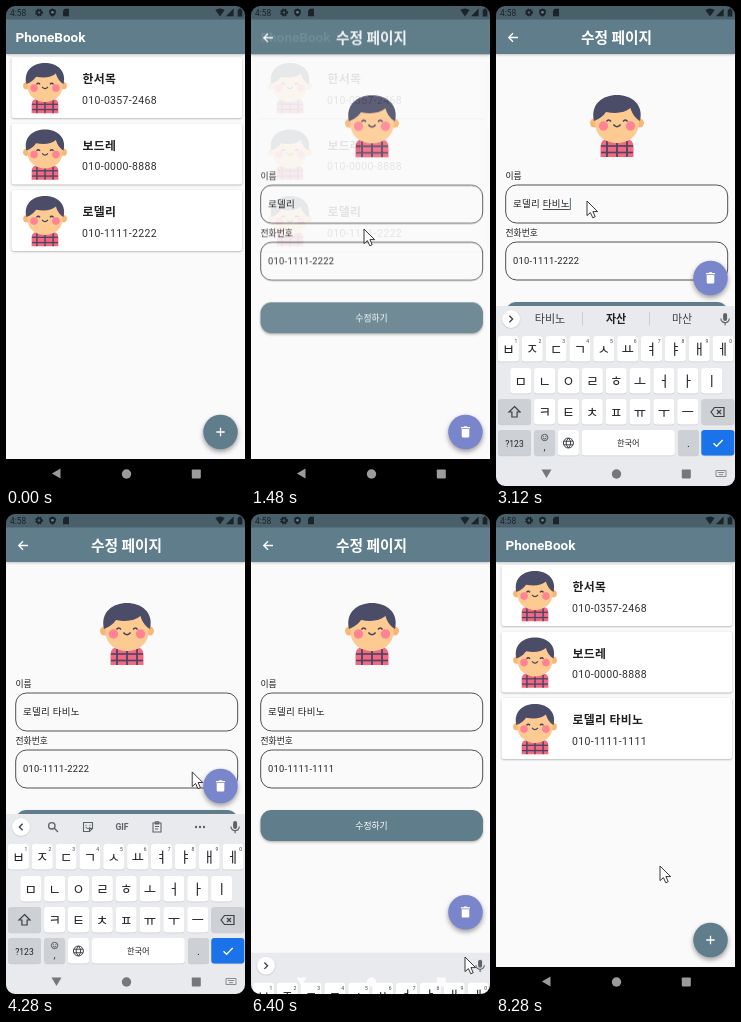
An HTML page with a canvas for the animation above (8.52 s loop, 239 by 480 pixels).

```html
<!DOCTYPE html>
<html lang="ko">
<head>
<meta charset="utf-8">
<title>PhoneBook</title>
<style>
html, body { margin: 0; width: 100%; height: 100%; overflow: hidden; background: #fafafa; }
canvas { display: block; width: 100vw; height: 100vh; }
</style>
</head>
<body>
<canvas id="stage"></canvas>
<script>
const W = 239, H = 480, LOOP = 8520;
const FONT = 'Roboto, "Noto Sans CJK KR", "Noto Sans CJK", sans-serif';
const SLATE = '#607d8b', INDIGO = '#7986cb', PAGE = '#fafafa', INK = '#212121', KEYBOARD = '#e8eaed';

const OLD_NAME = '로델리', NEW_NAME = '로델리 타비노';
const PREFIX = '010-1111-';
const PEOPLE = [['한서목', '010-0357-2468'], ['보드레', '010-0000-8888']];

const OPEN_EDIT = 1200, OPEN_LIST = 7245, PUSH = 300;
const FOCUS_NAME = 1840, FOCUS_PHONE = 3700, BLUR = 6200;

const NAME_STEPS = [[0, ''], [2320, ' '], [2440, ' ㅌ'], [2560, ' 타'], [2680, ' 탑'],
  [2800, ' 타비'], [2920, ' 타빈'], [3040, ' 타비노']];
const TAIL_STEPS = [[0, '2222'], [4360, '222'], [4560, '22'], [4760, '2'], [4920, ''],
  [5080, '1'], [5360, '11'], [5460, '111'], [5640, '1111']];
const POINTER = [[40, 213, 309], [320, 27, 102], [480, 27, 102], [1000, 113, 223], [1540, 113, 223],
  [1800, 91, 195], [3200, 91, 195], [3700, 118, 252], [4000, 118, 252], [4300, 187, 258],
  [4800, 116, 250], [5700, 116, 250], [6160, 214, 443], [6440, 214, 443], [7040, 147, 317],
  [7420, 147, 317], [7860, 169, 354], [8120, 169, 354], [8280, 164, 352]];

const canvas = document.getElementById('stage');
const buffer = document.createElement('canvas');
const off = buffer.getContext('2d');
let g = canvas.getContext('2d');

const clamp = v => Math.min(1, Math.max(0, v));
const mix = (a, b, p) => a + (b - a) * p;
const smooth = p => p * p * (3 - 2 * p);
const span = (t, start, length) => clamp((t - start) / length);

function bezier(x1, y1, x2, y2) {
  const at = (a, b, s) => 3 * a * s * (1 - s) ** 2 + 3 * b * s * s * (1 - s) + s ** 3;
  return p => {
    let lo = 0, hi = 1;
    for (let i = 0; i < 20; i++) {
      const mid = (lo + hi) / 2;
      if (at(x1, x2, mid) < p) lo = mid; else hi = mid;
    }
    return at(y1, y2, lo);
  };
}
const fastOutSlowIn = bezier(.4, 0, .2, 1), easeIn = bezier(.42, 0, 1, 1);

const current = (steps, t) => steps.filter(s => s[0] <= t).pop();

// Drawing helpers
function rect(x, y, w, h, fill) { g.fillStyle = fill; g.fillRect(x, y, w, h); }

function box(x, y, w, h, r, fill, line) {
  g.beginPath();
  g.roundRect(x, y, w, h, r);
  if (fill) { g.fillStyle = fill; g.fill(); }
  if (line) { g.strokeStyle = line; g.lineWidth = .9; g.stroke(); }
}

function disc(x, y, r, fill) {
  g.beginPath(); g.arc(x, y, r, 0, 7); g.fillStyle = fill; g.fill();
}

function icon(d, x, y, color, line = 0, scale = 1) {
  g.save();
  g.translate(x, y);
  g.scale(scale, scale);
  const path = new Path2D(d);
  if (line) { g.strokeStyle = color; g.lineWidth = line; g.stroke(path); }
  else { g.fillStyle = color; g.fill(path); }
  g.restore();
}

function shaded(blur, dy, draw, alpha = .3) {
  g.save();
  const k = canvas.width / W;
  g.shadowColor = `rgba(0,0,0,${alpha})`;
  g.shadowBlur = blur * k;
  g.shadowOffsetY = dy * k;
  draw();
  g.restore();
}

// Writes text centred vertically on y and returns its width.
function text(s, x, y, size, color, { weight = 400, align = 'left', gap = 0 } = {}) {
  g.font = `${weight} ${size}px ${FONT}`;
  g.letterSpacing = gap + 'px';
  g.textAlign = align;
  g.fillStyle = color;
  g.fillText(s, x, y + size * .36);
  return g.measureText(s).width;
}

function layer(alpha, dy, draw) {
  const main = g;
  g = off;
  g.clearRect(0, 0, W, H);
  draw();
  g = main;
  g.save();
  g.globalAlpha = alpha;
  g.drawImage(buffer, 0, dy, W, H);
  g.restore();
}

function avatar(x, y, scale) {
  const hair = '#4b4d68', skin = '#fdcb92', plaid = '#4a4565';
  g.save();
  g.translate(x, y);
  g.scale(scale, scale);
  box(-16.5, 44, 33, 18, [7, 7, 0, 0], '#f3687f');
  for (const px of [-10, 0, 10]) rect(px - .9, 46, 1.8, 16, plaid);
  for (const py of [51, 57.5]) rect(-16, py - .8, 32, 1.6, plaid);
  disc(-22.5, 28, 4.5, '#f9b776');
  disc(22.5, 28, 4.5, '#f9b776');
  icon('M-21.5 20C-21.5 2 21.5 2 21.5 20V29C21.5 41 11 48 0 48S-21.5 41-21.5 29Z', 0, 0, skin);
  icon('M-23 26C-27 9-14 0 0 0S27 9 23 26C19 24 15 19 13.5 13Q5 20-11 17Q-15 23-23 26Z', 0, 0, hair);
  disc(-13.5, 31, 4.7, '#ff8393');
  disc(13.5, 31, 4.7, '#ff8393');
  icon('M-10.5 26.5q2.2-3 4.4 0M6.1 26.5q2.2-3 4.4 0M-3.6 29.5q3.6 4.4 7.2 0', 0, 0, '#42415a', 1.6);
  g.restore();
}

function appBar() {
  shaded(3, 1.2, () => rect(0, 0, W, 48, SLATE));
}

function drawList(t) {
  rect(0, 0, W, H, PAGE);
  const edited = t >= OPEN_LIST;
  const third = edited ? [NEW_NAME, PREFIX + '1111'] : [OLD_NAME, PREFIX + '2222'];
  [...PEOPLE, third].forEach(([name, phone], i) => {
    const y = 51 + i * 66.5;
    shaded(2, .7, () => box(5.5, y, 230.5, 61, 2.5, '#fff'));
    avatar(39, y + 6, .81);
    text(name, 76.5, y + 22, 11.9, INK, { weight: 700, gap: .29 });
    text(phone, 76, y + 43, 10.5, '#303030', { gap: .32 });
  });
  appBar();
  text('PhoneBook', 9.5, 31, 13.5, '#fff', { weight: 700 });
}

function caret(x, y, t, lastChange) {
  if ((t - lastChange) % 1000 < 560) rect(x, y - 6, 1.1, 12, SLATE);
}

function drawEdit(t) {
  rect(0, 0, W, H, PAGE);
  avatar(121, 89, 1);
  text('이름', 9.5, 170, 8.8, INK);
  text('전화번호', 9.5, 227, 8.8, INK);
  box(9.7, 179, 222, 38, 11, null, '#3c3c3c');
  box(9.7, 236, 222, 38, 11, null, '#3c3c3c');

  const style = { gap: .29 };
  const [nameTime, added] = current(NAME_STEPS, t);
  const [tailTime, tail] = current(TAIL_STEPS, t);
  const nameEnd = 17 + text(OLD_NAME + added, 17, 198, 9.5, INK, style);
  const phoneEnd = 17 + text(PREFIX + tail, 17, 255, 9.3, INK, style);
  if (t >= FOCUS_NAME && t < FOCUS_PHONE) {
    caret(nameEnd, 198, t, Math.max(nameTime, FOCUS_NAME));
    if (added.length > 1) {
      const start = 17 + g.measureText('').width + textWidth(OLD_NAME + ' ', 9.5, .29);
      rect(start, 203, nameEnd - start, .8, INK);
    }
  } else if (t >= FOCUS_PHONE && t < BLUR) {
    caret(phoneEnd, 255, t, Math.max(tailTime, FOCUS_PHONE));
  }

  shaded(2.5, 1.2, () => box(9.5, 296, 222.5, 31, 11, SLATE));
  text('수정하기', 120.5, 312, 8.8, '#fff', { align: 'center' });
  appBar();
  if (t < OPEN_LIST) icon('M5 0H-4M0-4.3L-4.3 0L0 4.3', 17, 31.5, '#fff', 1.3);
  text('수정 페이지', 120.5, 32, 14.7, '#fff', { weight: 700, align: 'center' });
}

function textWidth(s, size, gap) {
  g.font = `400 ${size}px ${FONT}`;
  g.letterSpacing = gap + 'px';
  return g.measureText(s).width;
}

function drawFab(editing, y) {
  const x = 214.5;
  shaded(5, 2.5, () => disc(x, y, 17.3, editing ? INDIGO : SLATE), .38);
  if (editing) icon('M-3.8-3H3.8V4.2Q3.8 5.4 2.6 5.4H-2.6Q-3.8 5.4-3.8 4.2ZM-4.6-5H-2L-1.4-5.7H1.4L2-5H4.6V-3.8H-4.6Z', x, y, '#fff');
  else icon('M-4.2 0H4.2M0-4.2V4.2', x, y, '#fff', 1.3);
}

// Keyboard
function key(cx, cy, w, label, fill = '#fff', size = 13.5, color = '#202124') {
  box(cx - w / 2, cy - 12.4, w, 25.6, 3, '#c9ccd0');
  box(cx - w / 2, cy - 13, w, 25.6, 3, fill);
  if (label) text(label, cx, cy + .5, size, color, { align: 'center' });
}

function toolbar(t) {
  const y = 313, grey = '#5f6368';
  const typing = t >= 2440 && t < FOCUS_PHONE;
  const icons = !typing && t < BLUR;
  shaded(1.5, .5, () => disc(15, y, 9, '#fff'), .2);
  icon(icons ? 'M1.6-3.2L-1.6 0L1.6 3.2' : 'M-1.6-3.2L1.6 0L-1.6 3.2', 15, y, '#3c4043', 1.3);
  if (typing) {
    const word = current(NAME_STEPS, t)[1].trim();
    const mid = { align: 'center' };
    text(word, 54, y, 11, '#3c4043', mid);
    text('자산', 120, y, 11, INK, { align: 'center', weight: 700 });
    text('마산', 186, y, 11, '#3c4043', mid);
    rect(86, 306, .8, 14, '#c8cacd');
    rect(153, 306, .8, 14, '#c8cacd');
  } else if (icons) {
    icon('M2-1.2A3.2 3.2 0 1 1-4.4-1.2A3.2 3.2 0 1 1 2-1.2M1.1 1.1L5 5', 47, y, grey, 1.4);
    icon('M-4.5-4.5H4.5V1.5L1.5 4.5H-4.5ZM4.5 1.5H1.5V4.5M-2.3 0Q0 3 2.3 0M-2-2.2V-1.2M2-2.2V-1.2', 82, y, grey, 1.1);
    text('GIF', 116, y, 8.6, grey, { weight: 700, align: 'center' });
    icon('M-4-4H4V5H-4ZM-1.7-5.2H1.7V-3H-1.7ZM-2-.5H2M-2 2H1', 151, y, grey, 1.1);
    for (const dx of [-4, 0, 4]) disc(194 + dx, y, 1.2, grey);
  }
  box(227.1, 307, 4, 8, 2, grey);
  icon('M-4.2-.5A4.2 4.2 0 0 0 4.2-.5M0 3.7V6.3', 229.1, 313, grey, 1.2);
}

function drawKeyboard(t, drop) {
  g.save();
  g.translate(0, drop);
  rect(0, 300, W, 180, KEYBOARD);
  toolbar(t);
  const dim = '#cdd0d5', dark = '#3c4043';
  [...'ㅂㅈㄷㄱㅅㅛㅕㅑㅐㅔ'].forEach((c, i) => {
    const x = 12.4 + 23.85 * i;
    key(x, 343, 21, c);
    text(String((i + 1) % 10), x + 7.6, 335.5, 5, dark, { align: 'center' });
  });
  [...'ㅁㄴㅇㄹㅎㅗㅓㅏㅣ'].forEach((c, i) => key(24.8 + 23.85 * i, 375, 21, c));
  [...'ㅋㅌㅊㅍㅠㅜㅡ'].forEach((c, i) => key(48.6 + 23.85 * i, 406, 21, c));
  key(18.5, 406, 33, '', dim);
  icon('M0-5.5L5.5 0H2.6V5H-2.6V0H-5.5Z', 18.5, 406, dark, 1.2);
  key(221.8, 406, 33, '', dim);
  icon('M-6.5 0L-3-4.5H6.5V4.5H-3ZM-.5-2L3.5 2M3.5-2L-.5 2', 221.5, 406, dark, 1.2);
  key(18.5, 437, 33, '?123', dim, 8.5);
  key(48.6, 437, 21, '', dim);
  icon('M3.2 0A3.2 3.2 0 1 1-3.2 0A3.2 3.2 0 1 1 3.2 0M-1.6.6Q0 2.4 1.6.6M-1.2-1.4V-.6M1.2-1.4V-.6', 48.6, 431.5, dark, .8);
  text(',', 48.6, 440, 11, dark, { align: 'center' });
  key(72.4, 437, 21, '');
  icon('M5 0A5 5 0 1 1-5 0A5 5 0 1 1 5 0M0-5Q-4.6 0 0 5Q4.6 0 0-5M-4.5-1.8H4.5M-4.5 1.8H4.5', 72.4, 437, dark, 1);
  key(132.3, 437, 93, '한국어', '#fff', 8.2);
  key(192.5, 437, 21, '.', dim, 11);
  key(221.8, 437, 33, '', '#1a73e8');
  icon('M-4.5.2L-1.4 3.3L4.7-3', 222, 437, '#fff', 1.4);
  g.restore();
}

function navIcons(color, keyboardUp) {
  icon(keyboardUp ? 'M-5-4H5L0 4.6Z' : 'M4-5V5L-4.6 0Z', 50.5, 467.5, color);
  disc(120.5, 468, 4.7, color);
  box(185.8, 463.4, 9, 9, .8, color);
}

function statusBar() {
  rect(0, 0, W, 13.5, 'rgba(0,0,0,.24)');
  const ink = 'rgba(18,26,30,.85)';
  text('4:58', 4, 6.8, 8.4, ink);
  g.save();
  g.setLineDash([1.5, 1.1]);
  icon('M3.2 0A3.2 3.2 0 1 1-3.2 0A3.2 3.2 0 1 1 3.2 0', 33, 6.5, ink, 1.4);
  g.restore();
  icon('M2.1 0A2.1 2.1 0 1 1-2.1 0A2.1 2.1 0 1 1 2.1 0', 33, 6.5, ink, 1.6);
  icon('M0-4L3.3-2.6V.4Q3 3 0 4.2Q-3 3-3.3.4V-2.6Z', 46.5, 6.5, ink);
  disc(46.5, 6.2, 1.3, '#6d858f');
  icon('M-1.2-3.8H3V3.8H-3V-1.8Z', 60, 6.5, ink);
  icon('M-4.6-2.6Q0-5.6 4.6-2.6L0 3.8Z', 214, 6.7, ink);
  icon('M3.6-4V3.8H-4Z', 224, 6.5, ink);
  icon('M-2.3-3H-1V-4H1V-3H2.3V4H-2.3Z', 234, 6.5, ink);
}

function drawPointer(t) {
  if (t < POINTER[0][0]) return;
  const i = POINTER.findLastIndex(p => p[0] <= t);
  const a = POINTER[i], b = POINTER[i + 1] || a;
  const p = b === a ? 0 : smooth(span(t, a[0], b[0] - a[0]));
  const shape = 'M0 0V14.6L3.4 11.6L5.8 16.8L8.2 15.7L5.9 10.6H10.6Z';
  const x = mix(a[1], b[1], p), y = mix(a[2], b[2], p);
  icon(shape, x, y, '#fff');
  icon(shape, x, y, '#222', .9);
}

function corners() {
  g.beginPath();
  g.rect(0, 0, W, H);
  g.roundRect(0, 0, W, H, 9);
  g.fillStyle = '#000';
  g.fill('evenodd');
}

function draw(t) {
  const editing = t >= OPEN_EDIT && t < OPEN_LIST;
  const push = span(t, editing ? OPEN_EDIT : OPEN_LIST, PUSH);
  const pushing = t >= OPEN_EDIT && push < 1;
  const under = editing ? drawList : drawEdit;
  const over = t < OPEN_EDIT || !editing ? drawList : drawEdit;

  if (pushing) {
    under(t);
    layer(easeIn(push), 120 * (1 - fastOutSlowIn(push)), () => over(t));
  } else {
    over(t);
  }

  const rise = 1 - (1 - span(t, 1920, 260)) ** 2;
  const hidden = t < 4000 ? 1 - rise : smooth(span(t, 6220, 260));
  drawFab(editing, Math.min(426, 272 + 162 * hidden));

  if (hidden < 1) {
    drawKeyboard(t, 178 * hidden);
    if (hidden > 0) {
      navIcons('rgba(255,255,255,.8)', true);
    } else {
      navIcons('#757779', true);
      icon('M-5-3H5V3H-5ZM-3.2-1H3.2M-2 1.2H2', 225, 467.5, '#8a8c8f', 1);
    }
  } else {
    rect(0, 453, W, 27, '#000');
    navIcons('#9b9b9b', false);
  }
  statusBar();
  drawPointer(t);
  corners();
}

function resize() {
  const dpr = window.devicePixelRatio || 1;
  const w = Math.round(innerWidth * dpr), h = Math.round(innerHeight * dpr);
  if (canvas.width === w && canvas.height === h) return;
  for (const c of [canvas, buffer]) {
    c.width = w;
    c.height = h;
    c.getContext('2d').setTransform(w / W, 0, 0, h / H, 0, 0);
  }
}

function frame() {
  resize();
  draw(performance.now() % LOOP);
  requestAnimationFrame(frame);
}
frame();
</script>
</body>
</html>
```
